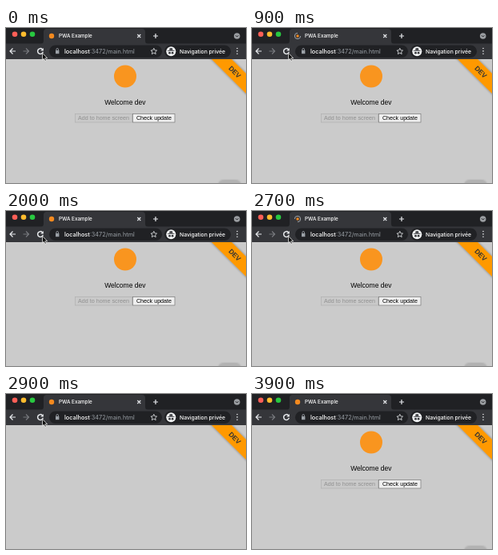
Recreate the animation shown at these times as an HTML page. Size 300x194 px, loop 4000 ms.

```html
<!DOCTYPE html>
<html lang="fr">
<head>
<meta charset="utf-8">
<title>PWA Example</title>
<style>
html, body { margin: 0; width: 100%; height: 100%; overflow: hidden; background: #202124; }
svg { display: block; width: 100vw; height: 100vh; font-family: "Liberation Sans", sans-serif; }
.ui { font-family: Inter, sans-serif; font-weight: 500; fill: #fff; }
.line { fill: none; stroke: #e8eaed; stroke-width: 1.2; }
.mid { text-anchor: middle; }
</style>
</head>
<body>
<svg viewBox="0 0 300 194">
  <defs>
    <filter id="shade" x="-20%" y="-20%" width="140%" height="140%">
      <feDropShadow dx="0" dy="0" stdDeviation="1.5" flood-opacity=".45"/>
    </filter>
    <clipPath id="view"><path d="M0 39h300v155H0z"/></clipPath>
  </defs>

  <!-- page -->
  <rect id="page" y="39" width="300" height="155" fill="#cbcbcb"/>
  <path id="edge" d="M97 193.5h109" stroke="#ddd"/>
  <g id="content">
    <circle cx="149" cy="60.5" r="14" fill="#f9951f"/>
    <text class="mid" x="148.8" y="96.4" font-size="8.5">Welcome dev</text>
    <rect x="86.5" y="107.5" width="71" height="10.5" fill="#c9c9c9" stroke="#b0b0b0" stroke-width=".7"/>
    <text class="mid" x="122" y="115.4" font-size="7.15" fill="#909090">Add to home screen</text>
    <rect x="158.5" y="107.5" width="52.5" height="10.5" fill="#efefef" stroke="#767676" stroke-width=".7"/>
    <text class="mid" x="185" y="115.4" font-size="7.15">Check update</text>
  </g>
  <rect id="tray" x="267" y="191.5" width="25" height="12" rx="4" fill="#b2b2b2" filter="url(#shade)"/>
  <g clip-path="url(#view)">
    <path d="M247 29L310 92V67L272 29z" fill="#ff9900" filter="url(#shade)"/>
    <text class="mid" transform="translate(286 55) rotate(45)" y="3" font-size="8.5" font-weight="600" fill="#333">DEV</text>
  </g>

  <!-- tab strip -->
  <path d="M0 0h300v20H0z" fill="#202124"/>
  <circle cx="11" cy="7.8" r="3.3" fill="#ff5f57"/>
  <circle cx="22" cy="7.8" r="3.3" fill="#febc2e"/>
  <circle cx="33" cy="7.8" r="3.3" fill="#28c840"/>
  <path d="M43 20q4 0 4-4V5q0-4 4-4h119q4 0 4 4v11q0 4 4 4z" fill="#35363a"/>
  <circle id="icon" cx="57" cy="10" fill="#f58a1f"/>
  <path id="spinner" d="M57 6.3a3.7 3.7 0 1 1-3.7 3.7" fill="none" stroke="#a0a4a9"/>
  <text class="ui" x="66" y="12.3" font-size="6.3">PWA Example</text>
  <path class="line" d="M164.3 8l4 4m0-4l-4 4M184 10h6M187 7v6"/>
  <circle cx="288.7" cy="10" r="3.8" fill="#9a9da1"/>
  <path d="M287 9.3l1.7 1.7 1.7-1.7" fill="none" stroke="#202124"/>

  <!-- toolbar -->
  <path d="M0 19.5h300V39H0z" fill="#35363a"/>
  <path class="line" d="M12 29H5m3.5-3.5L5 29l3.5 3.5"/>
  <path class="line" d="M21.5 29h7M25 25.5l3.5 3.5-3.5 3.5" style="stroke:#77797d"/>
  <circle id="ripple" cx="43" cy="29" r="8.5" fill="#606166"/>
  <path class="line" d="M45.5 26.7a3.4 3.4 0 1 0 .8 3.2" style="stroke-width:1.5"/>
  <path d="M46.8 25v3.6h-3.6z" fill="#e8eaed"/>
  <rect x="54" y="21.5" width="141" height="15.5" rx="7.75" fill="#202124"/>
  <path d="M62 28h4.4v4.2H62z" fill="#9aa0a6"/>
  <path class="line" d="M62.9 28v-1.2a1.3 1.3 0 0 1 2.6 0V28" style="stroke:#9aa0a6;stroke-width:.9"/>
  <text class="ui" x="73" y="31.7" font-size="7.3">localhost<tspan fill="#9aa0a6" font-weight="400">:3472/main.html</tspan></text>
  <path class="line" d="M184.8 25.3l1.1 2.5 2.7.3-2 1.8.6 2.7-2.4-1.4-2.4 1.4.6-2.7-2-1.8 2.7-.3z" style="stroke-width:.8"/>
  <rect x="198" y="21.5" width="83" height="15.5" rx="7.75" fill="#202124"/>
  <circle cx="206.3" cy="29.2" r="6" fill="#f1f3f4"/>
  <g fill="#35363a">
    <path d="M204 27.8l.7-2.6h3.2l.7 2.6zM202 28.2h8.6v.8H202z"/>
    <circle cx="204.5" cy="31.2" r="1.4"/>
    <circle cx="208.1" cy="31.2" r="1.4"/>
  </g>
  <text class="ui" x="217" y="31.7" font-size="6.8">Navigation privée</text>
  <path d="M289 25.5v7.2" stroke="#e8eaed" stroke-width="1.6" stroke-linecap="round" stroke-dasharray="0 3.4"/>

  <path id="cursor" d="M45.5 31.3v8.8l2-1.8 1.3 3 1.5-.7-1.3-2.9h2.7z" fill="#111" stroke="#fff" stroke-width=".7"/>
</svg>
<script>
const LOOP = 4000;
const get = id => document.getElementById(id);
const show = (id, on) => get(id).style.display = on ? "" : "none";
const set = (id, name, value) => get(id).setAttribute(name, value);

function draw(now) {
  const t = Math.floor(now % LOOP / 100) * 100;
  const within = (from, to) => t >= from && t < to;
  const loading = within(400, 600) || within(800, 1300) || within(2300, 2800);
  const blank = within(2800, 3000);

  show("content", !blank);
  show("tray", !within(2800, 3200));
  set("tray", "y", within(3200, 3700) ? 191.5 + (3700 - t) / 200 : 191.5);
  show("edge", t === 2800);
  set("page", "fill", t === 2800 ? "#fff" : "#cbcbcb");
  show("spinner", loading);
  set("spinner", "transform", `rotate(${t * .9} 57 10)`);
  set("icon", "r", loading ? 1.7 : 3.2);
  show("ripple", within(400, 600) || within(2300, 2500));
  show("cursor", t < 3400);
  requestAnimationFrame(draw);
}
requestAnimationFrame(draw);
</script>
</body>
</html>
```
